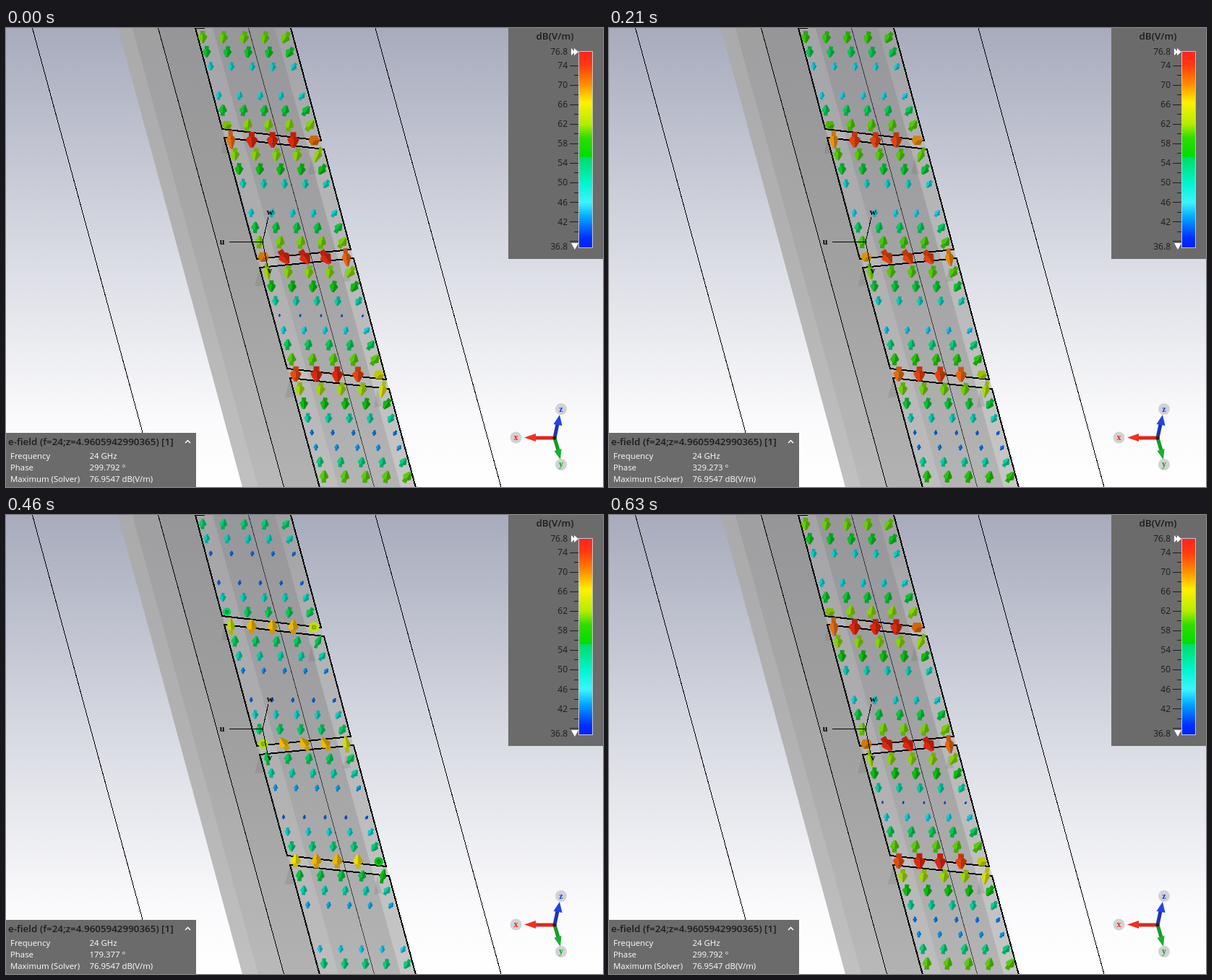
An HTML page with a canvas for the animation above (670 ms loop, 826x636 px).

```html
<!DOCTYPE html>
<html lang="en">
<head>
<meta charset="utf-8">
<title>E-field phase animation</title>
<style>
  html, body { margin: 0; width: 826px; height: 636px; overflow: hidden; background: #fff; }
  svg, canvas { position: absolute; left: 0; top: 0; display: block; }
  text { font-family: "Open Sans", "Noto Sans", sans-serif; }
  .head { font-size: 13.4px; font-weight: 600; fill: #1c1c1c; }
  .info { font-size: 11.4px; fill: #fff; }
  .tick { font-size: 12px; fill: #1c1c1c; text-anchor: end; }
  .axis { font: bold 12px "Liberation Serif", serif; text-anchor: middle; }
  .thin { stroke: #000; stroke-width: 1; fill: none; shape-rendering: crispEdges; }
  .edge { stroke: #000; stroke-width: 2; fill: none; shape-rendering: crispEdges; }
</style>
</head>
<body>
<svg width="826" height="636" viewBox="0 0 826 636">
  <defs>
    <linearGradient id="sky" x2="0" y2="1">
      <stop offset="0" stop-color="#a7abbc"/>
      <stop offset=".5" stop-color="#dadce4"/>
      <stop offset=".85" stop-color="#fafafc"/>
      <stop offset="1" stop-color="#fff"/>
    </linearGradient>
    <linearGradient id="slab" x2="0" y2="1">
      <stop offset="0" stop-color="#969698"/>
      <stop offset=".5" stop-color="#a0a0a1"/>
      <stop offset="1" stop-color="#b2b2b2"/>
    </linearGradient>
    <linearGradient id="plate" x2="0" y2="1">
      <stop offset="0" stop-color="#97979b"/>
      <stop offset=".5" stop-color="#a3a3a5"/>
      <stop offset="1" stop-color="#b4b4b4"/>
    </linearGradient>
    <linearGradient id="shine" x2="0" y2="1">
      <stop offset="0" stop-color="#fff" stop-opacity=".08"/>
      <stop offset=".3" stop-color="#fff" stop-opacity=".22"/>
      <stop offset="1" stop-color="#fff" stop-opacity=".25"/>
    </linearGradient>
    <linearGradient id="scale" x2="0" y2="1">
      <stop offset="0" stop-color="#ff2222"/>
      <stop offset=".07" stop-color="#ff3a10"/>
      <stop offset=".17" stop-color="#ff9000"/>
      <stop offset=".26" stop-color="#fff000"/>
      <stop offset=".37" stop-color="#b4ec00"/>
      <stop offset=".44" stop-color="#30dc00"/>
      <stop offset=".535" stop-color="#00dc00"/>
      <stop offset=".54" stop-color="#00dc64"/>
      <stop offset=".67" stop-color="#00f4d0"/>
      <stop offset=".77" stop-color="#3cf4ff"/>
      <stop offset=".85" stop-color="#00a0ff"/>
      <stop offset=".95" stop-color="#0030ff"/>
      <stop offset="1" stop-color="#0020ff"/>
    </linearGradient>
  </defs>

  <rect width="826" height="636" fill="url(#sky)"/>
  <path d="M155 0H393L567 636H327Z" fill="url(#slab)"/>
  <path d="M155 0H175L349 636H327Z" fill="#fff" opacity=".19"/>
  <path d="M175 0H210L384 636H349Z" fill="#fff" opacity=".09"/>
  <path d="M262 0H393L567 636H436Z" fill="url(#plate)"/>
  <path d="M262 0H286L460 636H436Z" fill="#fff" opacity=".13"/>
  <path d="M372 0H393L567 636H546Z" fill="url(#shine)"/>
  <path d="M299 140 436 156 440 168 302 152ZM347 320 477 307 481 319 351 332ZM389 472 526 487 530 500 393 485Z" fill="#fff" opacity=".12"/>
  <path d="M351 332 344 358 358 357ZM393 485 386 512 400 511ZM302 152 298 174 308 174ZM423 178 418 203 429 202ZM470 332 466 352 477 350ZM514 500 509 526 520 524Z" fill="#666" opacity=".2"/>

  <path class="thin" d="M36.500 0 209.500 636M210.500 0 384.500 636M511 0 685 636"/>
  <path class="thin" d="M335.500 0 509.500 636" stroke-opacity=".65"/>
  <path class="edge" d="M275 0H262L299 140 436 156 394 0M302 152 440 168 477 307 347 320ZM351 332 481 319 526 487 389 472ZM434 637 393 485 530 500 567 637"/>

  <g id="legend">
    <rect x="695" width="131" height="320" fill="#6b6b6b"/>
    <text class="head" x="733.500" y="16">dB(V/m)</text>
    <rect x="792.500" y="32.500" width="19" height="272" fill="url(#scale)" stroke="#c8c8c8"/>
    <path d="M782 28 787 33 782 38ZM786 28 792 33 786 38ZM782 298H792L787 307Z" fill="#fff"/>
  </g>

  <rect y="561" width="263" height="75" fill="#6b6b6b"/>
  <text class="head" x="3" y="578">e-field (f=24;z=4.9605942990365) [1]</text>
  <path d="M248 575 251.500 571.500 255 575" fill="none" stroke="#fff" stroke-width="1.500"/>
  <g class="info">
    <text x="6" y="597">Frequency</text><text x="115.500" y="597">24 GHz</text>
    <text x="6" y="613">Phase</text><text x="115.500" y="613" id="phase"></text>
    <text x="6" y="629">Maximum (Solver)</text><text x="115.500" y="629">76.9547 dB(V/m)</text>
  </g>

  <g stroke-width="5">
    <path d="M759 568 764 585" stroke="#149c28"/>
    <path d="M758.500 586 768.500 583 767 598Z" fill="#18b030"/>
    <path d="M759 568 763 549" stroke="#1c34b4"/>
    <path d="M757.500 549 766 536 769.500 551Z" fill="#2444e0"/>
    <path d="M761 568H732" stroke="#d82a20"/>
    <path d="M733 562 717 567.500 733 573Z" fill="#f03024"/>
  </g>
  <circle cx="759" cy="568" r="2.500" fill="#222"/>
  <g fill="#d2d2d2">
    <circle cx="705.500" cy="567.500" r="8"/><circle cx="768" cy="528" r="8"/><circle cx="768" cy="605" r="8"/>
  </g>
  <text class="axis" x="705.500" y="571" fill="#f02020">x</text>
  <text class="axis" x="768" y="532" fill="#1a3cf0">z</text>
  <text class="axis" x="768" y="608" fill="#10a020">y</text>
</svg>

<canvas id="field" width="826" height="636"></canvas>

<svg width="826" height="636" viewBox="0 0 826 636">
  <path class="thin" d="M309 296.500H355L363 262M355 296 362 331"/>
  <text class="axis" x="299" y="300">u</text>
  <text class="axis" x="365" y="259">w</text>
  <text class="axis" x="365" y="340">v</text>
</svg>

<script>
const ctx = document.getElementById('field').getContext('2d');
const phaseText = document.getElementById('phase');
const RAD = Math.PI / 180, MIN = 36.8, MAX = 76.8;
const LOOP = 670, STEPS = 16, STEP_DEG = 149.8962, PEAK = 295;

// Scale labels and ticks
(function () {
  const legend = document.getElementById('legend');
  const y = db => 51.5 + (74 - db) * 6.77;
  let out = '';
  const label = (txt, at) => out += `<text class="tick" x="777" y="${at + 4.5}">${txt}</text>`;
  label('76.8', 32.5);
  label('36.8', 302.5);
  for (let db = 74; db >= 38; db -= 2) {
    const major = db % 4 === 2 || db === 74;
    if (major && db > 40) label(db, y(db));
    out += `<path d="M${major ? 780 : 786} ${Math.round(y(db)) + .5}H792" stroke="#1c1c1c"/>`;
  }
  legend.insertAdjacentHTML('beforeend', out);
})();

// Peak level per row in dB; negative means pointing up
const rows = [
  61, 57, 48.5, 0, -48, -56.5, -62, 75.3,
  62, 58, 50, 0, -48, -56, -61.5, 75.3,
  62, 58, 51, 38.3, -47, -55, -60.5, 75.3,
  63, 58, 51.5, 42, -43.5, -53, -60.5
];

// Arrows at the slot ends: level, length factor, tilt, seen end-on
const ends = {
  '7,0': { db: 71.5, len: 1.9, tilt: -3 },
  '7,4': { db: 71.5, axial: true },
  '8,4': { db: 62.5, len: 1.75, tilt: 24 },
  '6,0': { db: -62, axial: true },
  '15,0': { db: 70.5, axial: true },
  '15,4': { db: 72, len: 1.6, tilt: -8 },
  '16,0': { db: 63, len: 1.8, tilt: -8 },
  '23,0': { db: 73.2, tilt: 3 },
  '23,3': { db: 73.5 },
  '23,4': { db: 65, axial: true },
  '24,4': { db: 65, len: 2, tilt: 12 }
};

const arrows = [];
rows.forEach((db, r) => {
  if (!db) return;
  for (let c = 0; c < 5; c++) {
    const tilt = r === 15 ? -32 : r % 8 === 7 ? 0 : [2, 9, 9, 11, 33][c];
    arrows.push({ x: 272 + 5.6 * r + 28.75 * c, y: 12.5 + 20.3 * r + .2 * c,
                  db, tilt, len: 1.3, ...ends[r + ',' + c] });
  }
});

const stops = [
  [36.8, 15, 30, 195], [42, 0, 115, 225], [46, 20, 205, 232], [50, 0, 208, 180],
  [54, 0, 205, 105], [58, 10, 190, 15], [62, 135, 212, 0], [66, 240, 226, 0],
  [70, 236, 142, 14], [73.5, 230, 68, 12], [75.5, 222, 36, 12]
];

function color(db) {
  let i = 1;
  while (i < stops.length - 1 && db > stops[i][0]) i++;
  const a = stops[i - 1], b = stops[i], k = Math.min(1, (db - a[0]) / (b[0] - a[0]));
  return [1, 2, 3].map(n => a[n] + (b[n] - a[n]) * k);
}

const shade = (rgb, k) => `rgb(${rgb.map(v => Math.min(255, Math.round(v * k)))})`;

function poly(fill, ...pts) {
  ctx.fillStyle = fill;
  ctx.beginPath();
  for (let i = 0; i < pts.length; i += 2) ctx.lineTo(pts[i], pts[i + 1]);
  ctx.fill();
}

function disc(fill, r) {
  ctx.fillStyle = fill;
  ctx.beginPath();
  ctx.arc(0, 0, r, 0, 7);
  ctx.fill();
}

function drawAxial(w, rgb, front) {
  const r = w / 2;
  if (front) {
    poly(shade(rgb, .9), -r, .1 * r, -.6 * r, -.8 * r, .6 * r, -.8 * r, r, 0, .6 * r, .85 * r, -.5 * r, .85 * r);
    poly(shade(rgb, .72), .15 * r, 0, r, 0, .6 * r, .85 * r, -.5 * r, .85 * r);
  } else {
    disc(shade(rgb, 1.02), r);
    disc(shade(rgb, .7), r * .45);
    disc(shade(rgb, .9), r * .25);
  }
}

function drawArrow(w, len, rgb, up) {
  const h = w / 2, top = -len / 2, base = -.08 * len, tip = len / 2, s = .24 * w;
  const half = (side, k) => poly(shade(rgb, k),
    0, base - .12 * len, side * .65 * h, base - .1 * len, side * h, base + .05 * len,
    side * .75 * h, base + .25 * len, side * .25 * h, tip, 0, tip);
  poly(shade(rgb, .84), -s, top, s, top, s, base, -s, base);
  half(-1, up ? .76 : 1);
  half(1, up ? 1 : .76);
}

function draw(phase) {
  const amp = Math.cos((phase - PEAK) * RAD);
  const drop = 20 * Math.log10(Math.abs(amp) + 1e-6);
  ctx.clearRect(0, 0, 826, 636);
  for (const a of arrows) {
    const db = Math.min(MAX, Math.abs(a.db) + drop);
    if (db < MIN) continue;
    const up = a.db * amp < 0, w = 17 * Math.sqrt((db - MIN) / (MAX - MIN)), rgb = color(db);
    ctx.save();
    ctx.translate(a.x, a.y);
    if (a.axial) drawAxial(w, rgb, amp > 0);
    else {
      ctx.rotate((a.tilt + (up ? 180 : 0)) * RAD);
      drawArrow(w * (a.len > 1.5 ? .8 : 1), w * Math.min(a.len, 1.65), rgb, up);
    }
    ctx.restore();
  }
  phaseText.textContent = +phase.toFixed(3) + ' °';
}

// 24 steps per second on a 10 ms clock, played forward then back
const starts = Array.from({ length: STEPS }, (_, i) => Math.round(i * 100 / 24) * 10);
let shown = -1;

function tick() {
  const t = performance.now() % LOOP;
  let i = STEPS - 1;
  while (starts[i] > t) i--;
  const k = Math.min(i, STEPS - 1 - i);
  if (k !== shown) {
    shown = k;
    draw((STEP_DEG * (k + 2)) % 360);
  }
  requestAnimationFrame(tick);
}
tick();
</script>
</body>
</html>
```
